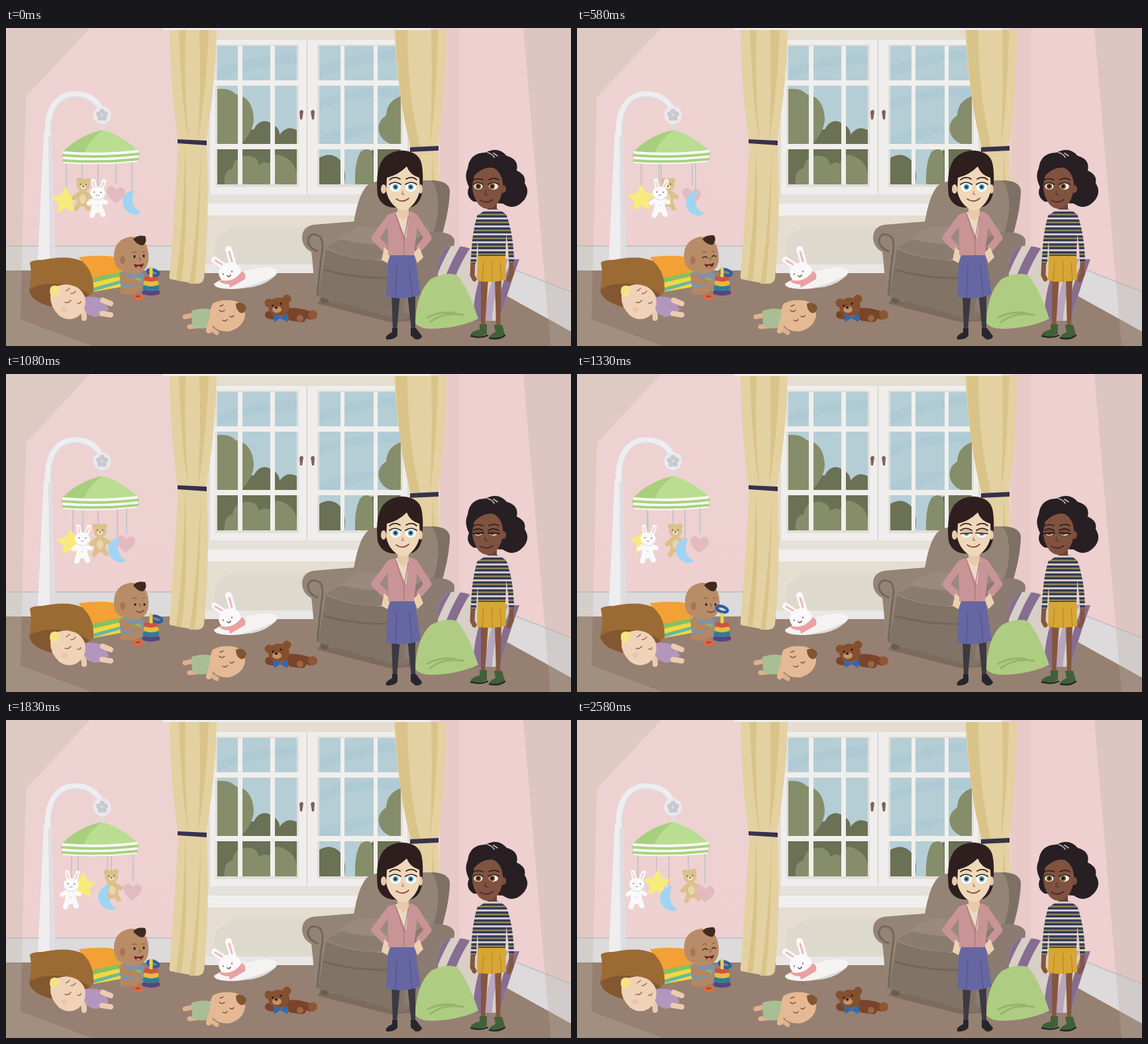
Write an HTML page that moves like this. It is 853 px wide and 480 px high and loops after 2.66 s.

```html
<!DOCTYPE html>
<html lang="en">
<head>
<meta charset="utf-8">
<title>Nursery</title>
<style>
html, body { margin: 0; width: 100%; height: 100%; overflow: hidden; background: #968072; }
svg { display: block; width: 853px; height: 480px; }
.line { fill: none; stroke-linecap: round; stroke-linejoin: round; }
.off { display: none; }
</style>
</head>
<body>
<svg viewBox="0 0 853 480">
<defs>
  <linearGradient id="wall" x2="0" y2="1"><stop stop-color="#edd3d2"/><stop offset="1" stop-color="#eed0cf"/></linearGradient>
  <pattern id="knit" width="6" height="12" y="274" patternUnits="userSpaceOnUse">
    <path fill="#3a3b50" d="M0 0H6V12H0z"/>
    <path fill="#cfcbd0" d="M0 0H6V3H0z"/>
    <path fill="#9d9560" d="M0 6.500H6V8.500H0z"/>
  </pattern>
  <clipPath id="glass"><path d="M319 27H439V236H319zM473 27H596V236H473z"/></clipPath>
  <clipPath id="cushion"><path d="M652 354Q658 332 672 329Q692 328 706 335Q740 350 775 349Q758 396 745 442H708Q680 410 652 390z"/></clipPath>
</defs>

<!-- room -->
<path fill="url(#wall)" d="M0 0H685V366H0z"/>
<path fill="#edd0cf" d="M685 0H853V480H685z"/>
<path fill="#e8cac9" d="M655 0H685V340H655z"/>
<path fill="#968072" d="M0 366H700L752 402 853 458V480H0z"/>
<path fill="#dcdadb" d="M0 329H307V366H0zM750 358L853 398V458L750 401z"/>
<path class="line" stroke="#c5c2c6" stroke-width="2" d="M0 329H307M750 358L853 398"/>

<!-- window -->
<path fill="#e4ddd0" d="M300 2H610V283H532V357H300z"/>
<path fill="#ded9cd" d="M344 300H540V357H322Q312 340 317 318z"/>
<path fill="#e9e7e6" d="M300 357H470V370H300z"/>
<path fill="#f0eeec" d="M308 18H606V251H308z"/>
<path fill="#e2ded8" d="M316 25H442V240H316zM470 25H599V240H470z"/>
<g clip-path="url(#glass)">
  <path fill="#b5ced6" d="M319 27H596V236H319z"/>
  <path fill="#aecad4" d="M319 62Q360 45 440 38V54Q370 55 319 78zM473 58Q530 35 596 34V46Q530 50 473 76zM473 108Q540 86 596 90V105Q520 100 473 124zM473 165Q530 140 570 150L473 185z"/>
  <path fill="#6a7154" d="M319 236V176H352Q357 153 374 153Q384 135 399 143Q413 150 413 161Q424 146 439 154V236zM473 196Q490 186 503 198Q515 210 511 236H473zM551 236V186Q575 172 596 184V236z"/>
  <path fill="#868d6a" d="M319 92Q338 90 347 100Q372 104 374 136Q374 154 358 172Q352 178 319 178zM596 103Q575 110 574 132Q558 142 564 160Q572 177 596 178zM536 186Q552 177 554 196V236H527Q526 200 536 186z"/>
  <path fill="#868d6a" d="M330 236Q328 214 342 212Q344 195 361 193Q379 191 382 207Q390 200 397 205Q404 184 421 195Q437 203 439 220V236z"/>
</g>
<g fill="#f1efec">
  <path d="M350 27H357V236H350zM399 27H406V236H399zM505 27H511V236H505zM555 27H561V236H555z"/>
  <path d="M316 79H442V87H316zM316 175H442V183H316zM470 79H599V87H470zM470 175H599V183H470z"/>
</g>
<path class="line" stroke="#d6d1ca" stroke-width="1.500" d="M454.500 19V250"/>
<path fill="#7e605c" d="M443 126Q447 121 449 126L447 138H444zM460 126Q464 121 466 126L465 138H462z"/>
<path fill="#e5e0da" d="M306 251H560V266H306z"/>
<path fill="#f1efee" d="M304 265H560V283H304z"/>

<!-- curtains -->
<path fill="#e3d1a1" d="M247 3H318Q316 90 302 169L303 178Q308 280 299 377Q298 387 285 386L248 379Q246 378 247 372Q255 270 260 178L259 168Q247 80 247 3zM586 3H664Q664 100 652 179V187L657 270H617L611 187V179Q592 110 586 3z"/>
<path fill="#d9c388" d="M261 3H271Q268 100 276 169Q266 130 261 3zM292 3H306Q302 100 290 169Q294 100 292 3zM270 178Q276 290 265 382L257 380Q269 290 270 178zM294 178Q294 290 285 386H277Q291 290 294 178zM588 3H606Q606 100 625 179H611Q592 110 588 3zM642 3H652Q650 110 640 179Q644 100 642 3zM624 187Q630 230 630 270H623zM644 187L649 270H643z"/>
<path fill="#37314f" d="M259 168L303 170V177L259 174zM610 180L653 178V185L610 187z"/>
<path fill="#f1eeee" d="M237 0H641V3H237z"/>

<!-- armchair -->
<path fill="#716158" opacity=".7" d="M474 410L612 427V442L580 444 470 416z"/>
<path fill="#65604a" d="M475 402H490L486 415Q478 418 475 412z"/>
<path fill="#938475" d="M524 300Q531 252 545 238Q552 231 568 231L640 230Q669 230 670 246Q669 280 655 322L480 335V310z"/>
<path fill="#7f7065" d="M641 230Q669 230 670 246Q669 280 655 322H641Q658 275 650 247Q648 235 641 230z"/>
<path fill="#998a7d" d="M482 331L530 300H640V350H495z"/>
<path fill="#827367" d="M480 332Q520 353 580 350L675 318V380L600 442 470 405z"/>
<path fill="#8b7c70" d="M483 331L505 319Q550 330 610 327V350Q520 354 483 331z"/>
<path fill="#938475" d="M447 315Q448 300 464 297L540 291L529 303 494 312Q480 317 483 335L472 400 466 402Q464 360 461 338Q447 331 447 315z"/>
<path class="line" stroke="#74665d" stroke-width="3" d="M470 337Q455 331 456 319Q460 307 473 314Q481 320 476 345L470 402M480 365Q530 379 580 377"/>
<path fill="#8b7b70" d="M612 325Q625 308 655 308Q674 310 677 320Q678 340 660 345L640 430H600z"/>

<!-- cushions -->
<g clip-path="url(#cushion)">
  <path fill="#d8cfc7" d="M640 320H790V450H640z"/>
  <g class="line" stroke-width="14">
    <path stroke="#876d91" d="M668 322Q646 360 640 385M695 328Q668 370 658 420M736 345Q712 390 712 445M774 344Q748 400 746 450"/>
    <path stroke="#b8a5bd" stroke-width="11" d="M754 345Q730 395 728 445"/>
  </g>
</g>
<path fill="#aecd82" d="M618 446Q619 400 641 379Q664 367 681 373Q699 395 713 439Q680 454 640 454Q624 453 618 446z"/>
<path class="line" stroke="#94b66b" stroke-width="3" d="M640 444Q660 428 690 433M636 437Q655 427 677 430"/>

<!-- mobile stand -->
<path fill="#eeedef" d="M57 158H69L74 350H48z"/>
<path fill="#dedde1" d="M64 158H69L74 350H66z"/>
<path class="line" stroke="#eeedef" stroke-width="9" d="M63 160C62 117 82 100 104 100C125 100 138 110 144 124"/>
<path class="line" stroke="#dcdbe0" stroke-width="2" d="M68 155C68 120 84 104 104 104C121 104 132 112 139 123"/>
<path class="line" stroke="#dddce1" stroke-width="5" d="M145 143V156"/>
<circle cx="145" cy="131.500" r="13.500" fill="#eae9ec"/>
<g fill="#cac9d0"><circle cx="145" cy="126" r="4"/><circle cx="150" cy="130" r="4"/><circle cx="148" cy="136" r="4"/><circle cx="142" cy="136" r="4"/><circle cx="140" cy="130" r="4"/></g>
<g id="strings" class="line" stroke="#c9c4ca" stroke-width="2"></g>
<g id="canopy">
  <path fill="#b9dd91" d="M146 154C122 159 101 171 86 187Q143 193 200 185C184 171 166 159 146 154z"/>
  <path fill="#a7cf7d" d="M146 154C122 159 101 171 86 187Q101 190 118 190Q123 172 146 154z"/>
  <path fill="#fafaf7" d="M86 186Q143 191 200 184L199 202Q143 208 87 204z"/>
  <path class="line" stroke="#a9d27f" stroke-width="4" stroke-linecap="butt" d="M86 192Q143 197 200 190M87 200Q143 204 199 198"/>
</g>
<g id="toys">
  <g><path fill="#f7eb7c" stroke="#f7eb7c" stroke-width="4" stroke-linejoin="round" d="M1-17L6-6 17-5 9 4 12 15 1 9-9 16-7 4-17-3-5-6z"/></g>
  <g>
    <g fill="#dcc08c"><circle cx="-7" cy="-21" r="4"/><circle cx="7" cy="-21" r="4"/><circle cy="-14" r="10"/><ellipse cy="6" rx="9" ry="13"/>
    <path class="line" stroke="#dcc08c" stroke-width="7" d="M-6 0L-13 6M6 0L13 4M-5 14L-9 22M5 14L9 21"/></g>
    <ellipse cy="7" rx="5" ry="7" fill="#e9d6ac"/><ellipse cy="-11" rx="4" ry="3" fill="#eee0c2"/>
    <g fill="#6c5137"><circle cx="-4" cy="-15" r="1"/><circle cx="4" cy="-15" r="1"/><circle cy="-12" r="1.200"/></g>
  </g>
  <g><path fill="#e4bac2" d="M0 14C-9 7-15 1-14-6C-12-14-3-13 0-6C4-13 13-12 14-4C14 3 6 9 0 14z"/></g>
  <g><path fill="#9fd5f3" d="M5-18C-17-18-19 12 2 18C8 20 13 18 15 15C3 11-2-5 5-18z"/></g>
  <g>
    <g class="line" stroke="#faf9fa"><path stroke-width="6.500" d="M-4-14L-7-27M5-14L9-27M-6 2L-13 7M6 2L13 5"/><path stroke-width="8" d="M-4 14L-7 25M5 14L9 23"/></g>
    <g fill="#faf9fa"><ellipse cy="-9" rx="11.500" ry="9.500"/><ellipse cy="9" rx="8.500" ry="12"/></g>
    <path class="line" stroke="#efcbd3" stroke-width="2" d="M-5-18L-7-26M6-18L9-26"/>
    <g fill="#746c72"><circle cx="-5" cy="-10" r="1"/><circle cx="5" cy="-10" r="1"/></g>
    <path class="line" stroke="#d88c9b" d="M-2-6Q0-4 2-6"/>
    <path class="line" stroke="#dcd9de" d="M-7 0Q0 3 7 0M-2 10Q0 12 2 10"/>
  </g>
</g>

<!-- bedding -->
<path fill="#f2d73f" d="M122 384L176 370 178 390 128 399z"/>
<path fill="#86c063" d="M118 377L176 364V374L124 386z"/>
<path fill="#66b8a5" d="M128 393L176 380 175 385 130 398z"/>
<path fill="#f3a135" d="M110 346Q140 342 161 345Q179 354 178 367L122 379Q119 358 110 346z"/>
<path fill="#9c6b33" d="M36 354Q40 350 55 350Q94 342 115 352Q134 369 132 398Q112 419 70 421Q37 413 35 395Q40 374 36 354z"/>
<path fill="#835730" d="M35 395Q48 386 70 386Q100 384 126 402Q112 419 70 421Q37 413 35 395z"/>

<!-- sitting baby -->
<path fill="#8292a5" d="M173 369Q190 362 208 371L207 396 176 398Q170 385 173 369z"/>
<path class="line" stroke="#b5865f" stroke-width="10" d="M177 397Q190 400 200 392M176 374Q178 385 192 382"/>
<ellipse cx="198" cy="381" rx="7" ry="4" fill="#88b86a"/>
<g id="babyHead">
  <path fill="#b98c68" d="M163 347Q162 319 188 315Q213 315 215 341Q217 362 203 369Q185 374 171 364Q163 358 163 347z"/>
  <path fill="#40291f" d="M192 319Q198 312 210 314Q214 322 207 328Q200 329 192 319z"/>
  <ellipse cx="176" cy="350" rx="4" ry="6" fill="#a87451"/>
  <path class="line" stroke="#966548" stroke-width="1.500" d="M201 347Q205 349 202 351M191 339Q194 337 197 339M206 338L209 338"/>
  <g class="face">
    <g fill="#2f211d"><ellipse cx="194" cy="345" rx="1.600" ry="2.200"/><ellipse cx="208" cy="344" rx="1.600" ry="2.200"/></g>
    <path fill="#6e2a27" d="M193 356Q201 359 208 355Q206 364 199 363Q194 362 193 356z"/><path fill="#d7807a" d="M196 361Q200 358 204 361Q200 365 196 361z"/>
  </g>
  <g class="face">
    <path class="line" stroke="#3b261e" stroke-width="1.500" d="M191 347Q194 344 198 347M205 346Q208 343 211 346"/>
    <path fill="#6e2a27" d="M193 356Q201 359 208 355Q206 364 199 363Q194 362 193 356z"/><path fill="#d7807a" d="M196 361Q200 358 204 361Q200 365 196 361z"/>
  </g>
  <g class="face">
    <g fill="#2f211d"><ellipse cx="195" cy="348" rx="1.600" ry="2"/><ellipse cx="209" cy="348" rx="1.600" ry="2"/></g>
    <path class="line" stroke="#6e4030" stroke-width="1.500" d="M197 358Q203 362 208 357"/>
  </g>
</g>
<ellipse cx="199" cy="406" rx="8.500" ry="4.500" fill="#e16a42"/><ellipse cx="199" cy="405" rx="4" ry="1.500" fill="#a7462f"/>
<g class="line" stroke-width="7">
  <path stroke="#5c4281" d="M209 399Q219 402 229 399"/><path stroke="#297f98" d="M210 392Q219 395 228 392"/>
  <path stroke="#e8bb3c" d="M211 385Q219 388 227 385"/><path stroke="#d55040" d="M212 378Q219 380 226 378"/>
</g>
<ellipse id="ring" rx="8.500" ry="4" fill="none" stroke="#2b61a2" stroke-width="4.500"/>
<path class="line" stroke="#f0ce4b" stroke-width="5" d="M219 363V374"/>
<path class="line" stroke="#b5865f" stroke-width="6" d="M191 381L203 385"/>

<!-- sleeping babies -->
<path fill="#b396bd" d="M111 407Q130 403 147 409L155 425Q147 436 133 436L112 427z"/>
<path class="line" stroke="#edcbb0" stroke-width="8" d="M146 411L158 416M145 431L158 433M107 420Q119 427 118 438"/>
<path fill="#f0d2b8" d="M67 405Q69 388 91 387Q113 389 119 406Q123 424 108 436Q94 444 80 434Q66 420 67 405z"/>
<path fill="#f4e486" d="M67 392Q72 386 81 391Q82 403 71 405Q64 403 67 392z"/>
<path class="line" stroke="#9d6c56" stroke-width="1.500" d="M89 414Q94 416 98 411M98 401Q103 401 105 397M108 415Q112 417 113 413M91 397L96 393"/>
<ellipse cx="88" cy="425" rx="5" ry="4" fill="#ebc4ab"/>

<path class="line" stroke="#dfb18d" stroke-width="7" d="M284 433L270 436M287 450L277 451M308 453L318 460"/>
<path fill="#a9be94" d="M280 427Q296 421 311 425V450Q295 457 281 450z"/>
<path fill="#e4b994" d="M312 416Q326 408 346 412Q361 417 361 434Q358 452 337 458Q313 459 308 440Q307 425 312 416z"/>
<path fill="#80552f" d="M347 416Q358 412 363 422Q361 432 354 430Q347 426 347 416z"/>
<path class="line" stroke="#80583f" stroke-width="1.500" d="M322 426Q326 430 330 426M338 435Q341 438 344 434M327 441Q331 444 334 440M323 420L328 418"/>
<path class="line" stroke="#e4b994" stroke-width="8" d="M310 442Q307 452 306 457"/>

<!-- plush toys -->
<path fill="#f5f3f2" d="M314 386Q335 372 378 363Q400 358 409 366Q411 374 396 380Q365 393 344 394Q314 394 314 386z"/>
<path fill="#dfdbdb" d="M347 394Q386 386 408 372Q396 386 373 391Z"/>
<path class="line" stroke="#faf8f8" stroke-width="10" d="M331 361L315 350M344 361L336 334"/>
<path class="line" stroke="#edb9be" stroke-width="3" d="M326 357L316 351M341 352L337 338"/>
<ellipse cx="338" cy="369" rx="17" ry="15" fill="#faf8f8" transform="rotate(-12 338 369)"/>
<path fill="#e9a1a4" d="M321 380Q343 386 356 367Q363 370 361 379L349 386 338 392 337 387Q324 387 321 380z"/>
<path class="line" stroke="#6e6264" stroke-width="1.700" d="M328 371V372M341 367V368M334 374Q337 377 339 373"/>

<path class="line" stroke="#7a442a" stroke-width="12" d="M424 429Q441 427 459 434M431 436L447 438M404 434L397 433"/>
<circle cx="463" cy="433" r="7" fill="#8f5635"/><circle cx="444" cy="438" r="5" fill="#9c6642"/>
<g fill="#85502f"><circle cx="397" cy="415" r="6.500"/><circle cx="424" cy="409" r="6.500"/><ellipse cx="412" cy="421" rx="16" ry="14"/></g>
<ellipse cx="409" cy="425" rx="7" ry="5" fill="#c19368"/>
<g fill="#2b1b17"><circle cx="403" cy="419" r="1.600"/><circle cx="415" cy="416" r="1.600"/><ellipse cx="408" cy="422" rx="2.500" ry="1.800"/></g>
<path fill="#3469ad" d="M414 436L403 430 405 444 414 438 425 444 426 431z"/>

<!-- light from the sides -->
<path fill="#b9b49e" opacity=".29" d="M0 0H127L30 104 22 440 130 480H0z"/>
<path fill="#b5ac9e" opacity=".3" d="M781 0H853V480H822z"/>

<!-- woman in the cardigan -->
<path fill="#2e1f1e" d="M561 252Q557 214 570 197Q582 184 601 185Q622 187 627 203Q631 220 628 250Q624 268 610 271H584Q566 269 561 252z"/>
<path fill="#3b3a42" d="M582 400H595L590 457H584zM606 400H618L618 457H612z"/>
<path fill="#27262c" d="M583 453H591V464Q587 471 574 470Q571 465 583 459zM611 453H619L628 465Q627 471 618 470L611 464z"/>
<path fill="#6667a2" d="M577 342H617L626 402Q600 412 574 405z"/>
<path class="line" stroke="#56578f" stroke-width="1.500" d="M590 360L588 406M609 360L613 405"/>
<path class="line" stroke="#c99496" stroke-width="11" d="M580 286L557 317 571 331M617 286L637 317 625 331"/>
<path fill="#ecd0b0" d="M571 331L581 339 576 355 567 350zM624 331L615 339 621 355 630 346z"/>
<path fill="#c99496" d="M576 282Q587 277 598 278L612 277Q621 280 622 288L616 343H577z"/>
<path fill="#e9dbc1" d="M588 278H608L604 318 599 307z"/>
<path class="line" stroke="#ab777d" stroke-width="1.300" d="M588 280L601 320V343M608 280L601 320"/>
<path fill="#e6caa9" d="M591 265H608V283L600 291 591 283z"/>
<ellipse cx="570" cy="243" rx="4" ry="7" fill="#e9cbab"/><ellipse cx="626" cy="243" rx="3" ry="7" fill="#e9cbab"/>
<path fill="#efd8ba" d="M575 226Q592 222 605 209Q610 222 624 226L625 244Q622 260 611 270Q600 280 588 270Q577 261 574 246z"/>
<g fill="#fff"><ellipse cx="588" cy="240" rx="8" ry="7"/><ellipse cx="611" cy="240" rx="8" ry="7"/></g>
<g fill="#579fbe"><circle cx="588" cy="240" r="4.200"/><circle cx="611" cy="240" r="4.200"/></g>
<g fill="#152432"><circle cx="588" cy="240" r="2"/><circle cx="611" cy="240" r="2"/></g>
<g id="lidA"><path fill="#dfbd9f" d="M579 240Q580 232 588 232Q597 232 597 240zM602 240Q603 232 611 232Q620 232 620 240z"/><path class="line" stroke="#33221f" stroke-width="1.700" d="M579 241L597 240M602 240L620 241"/></g>
<path class="line" stroke="#33221f" stroke-width="1.700" d="M579 236Q587 230 596 236M603 236Q612 230 620 236M579 229Q587 223 595 228M604 228Q613 223 620 229"/>
<path class="line" stroke="#b88368" stroke-width="1.400" d="M599 247L598 251 601 251"/>
<path class="line" stroke="#924c44" stroke-width="1.800" d="M589 258Q599 265 608 257"/>

<!-- woman in the striped sweater -->
<path fill="#271f23" d="M697 212Q700 188 724 188Q743 178 756 193Q775 198 771 215Q786 222 783 234Q793 250 779 263Q766 276 750 265L706 262Q693 254 699 240Q691 224 697 212z"/>
<path fill="#85563f" d="M717 378H728L723 451H717zM738 378H748L746 451H740z"/>
<path fill="#40603b" d="M715 447H726V462Q716 468 702 464Q700 459 715 455zM737 448H749L753 462Q748 470 730 468Q729 463 739 459z"/>
<path class="line" stroke="#222b25" stroke-width="2.500" d="M702 465Q717 469 727 464M730 468Q745 471 753 464"/>
<path class="line" stroke="#85563f" stroke-width="7" d="M705 350L704 373 707 379M763 350L763 372 759 380"/>
<path class="line" stroke="url(#knit)" stroke-width="8" d="M715 285Q707 312 706 352M752 284Q762 312 763 350"/>
<path fill="url(#knit)" d="M711 284Q722 275 729 273H741Q754 277 756 287L754 347H713z"/>
<path fill="#d8a634" d="M712 344H754L755 380Q733 386 711 381z"/>
<path class="line" stroke="#b98a26" stroke-width="1.300" d="M721 354L719 381M734 352V383M746 354L748 381"/>
<path fill="#6c4132" d="M727 260H741V274H727z"/>
<path fill="#805240" d="M707 222Q721 208 737 211Q751 221 750 239Q749 261 736 270Q725 277 714 267Q704 254 704 238z"/>
<path fill="#271f23" d="M704 227Q714 212 732 210Q747 213 751 235Q764 222 755 200L724 196Z"/>
<ellipse cx="751" cy="243" rx="4" ry="6" fill="#7c4f3c"/>
<g fill="#f3ece4"><ellipse cx="713" cy="239" rx="6.500" ry="5"/><ellipse cx="736" cy="239" rx="7" ry="5"/></g>
<g fill="#6b4c26"><circle cx="713" cy="239" r="4"/><circle cx="734" cy="239" r="4"/></g>
<g fill="#1c1515"><circle cx="713" cy="239" r="2"/><circle cx="734" cy="239" r="2"/></g>
<g id="lidB"><path fill="#734634" d="M705 240Q706 233 713 233Q721 233 721 240zM728 240Q729 233 736 233Q745 233 745 240z"/><path class="line" stroke="#241a1a" stroke-width="1.800" d="M705 241L721 240M728 240L745 241"/></g>
<path class="line" stroke="#241a1a" stroke-width="1.600" d="M706 236Q712 231 720 236M728 236Q736 231 744 236M706 229Q713 226 720 229M729 229Q737 225 744 229"/>
<path class="line" stroke="#5c3429" stroke-width="1.400" d="M724 246L723 251 727 252"/>
<path class="line" stroke="#53272a" stroke-width="1.800" d="M716 260Q726 266 735 259"/>
<path class="line" stroke="#b9b4b8" stroke-width="1.800" d="M727 188Q734 190 737 195M736 189L742 193"/>
</svg>
<script>
const FPS = 12, LOOP = 2660, LAST = 31;
const $ = id => document.getElementById(id);
const KEYS = [0, 7, 13, 16, 22, 27, LAST];

// hanging toys, back to front: string x, sideways offset, start and end y, start and end tilt
const toys = [
  { x: [91, 97, 101, 106, 109, 113, 120], dx: [-2, -1, -5, -6, 6, 2, 0], y: [260, 246], tilt: [0, 4] },
  { x: [115, 127, 139, 145, 159, 164, 168], dx: [1, 10, 3, 4, 1, 3, 4], y: [251, 250], tilt: [3, -6] },
  { x: [166, 174, 182, 186, 192, 197, 193], dx: [0, -1, -1, -1, -1, 0, 1], y: [251, 262], tilt: [4, 0] },
  { x: [190, 179, 168, 163, 153, 145, 139], dx: [-1, -2, -1, -1, -1, -1, -1], y: [263, 269], tilt: [0, 4] },
  { x: [139, 124, 116, 107, 99, 89, 92], dx: [-1, 1, -1, 0, -1, -1, -2], y: [258, 257], tilt: [2, 3] }
];
const ring = { at: [0, 7, 13, 16, 19, 22, LAST], x: [222, 225, 227, 219, 219, 222, 223], y: [369, 369, 370, 355, 356, 368, 369] };

const lerp = (a, b, p) => a + (b - a) * p;
function track(at, vals, k) {
  let i = 0;
  while (i < at.length - 2 && k >= at[i + 1]) i++;
  return lerp(vals[i], vals[i + 1], (k - at[i]) / (at[i + 1] - at[i]));
}
const show = (el, on) => el.classList.toggle('off', !on);
const within = (k, a, b) => k >= a && k < b;

const faces = [...document.querySelectorAll('.face')];
toys.forEach((toy, i) => {
  toy.el = $('toys').children[i];
  toy.line = $('strings').appendChild(document.createElementNS('http://www.w3.org/2000/svg', 'path'));
});

function draw(k) {
  const p = k / LAST;
  for (const { x, dx, y, tilt, el, line } of toys) {
    const sx = track(KEYS, x, k), tx = sx + track(KEYS, dx, k);
    const ty = lerp(...y, p);
    el.setAttribute('transform', `translate(${tx} ${ty}) rotate(${lerp(...tilt, p)})`);
    line.setAttribute('d', `M${sx} 202V${ty - 16}`);
  }
  $('canopy').setAttribute('transform', `translate(${-1.6 * Math.min(1, k / 24)} 0)`);

  const mood = within(k, 9, 19) ? 2 : within(k, 4, 9) || k >= 25 ? 1 : 0;
  faces.forEach((f, i) => show(f, i === mood));
  $('babyHead').setAttribute('transform', mood === 1 ? 'rotate(-3 190 370)' : '');
  $('ring').setAttribute('transform', `translate(${track(ring.at, ring.x, k)} ${track(ring.at, ring.y, k)}) rotate(18)`);

  show($('lidA'), within(k, 15, 18));
  show($('lidB'), within(k, 12, 18));
}

// step starts fall on multiples of 10 ms
function stepAt(t) {
  const k = Math.floor((t + 4) * FPS / 1000);
  return Math.min(LAST, Math.round(k * 100 / FPS) * 10 > t ? k - 1 : k);
}

const start = performance.now();
let shown = -1;
function tick(now) {
  const k = stepAt(Math.max(0, now - start) % LOOP);
  if (k !== shown) draw(shown = k);
  requestAnimationFrame(tick);
}
tick(start);
</script>
</body>
</html>
```
